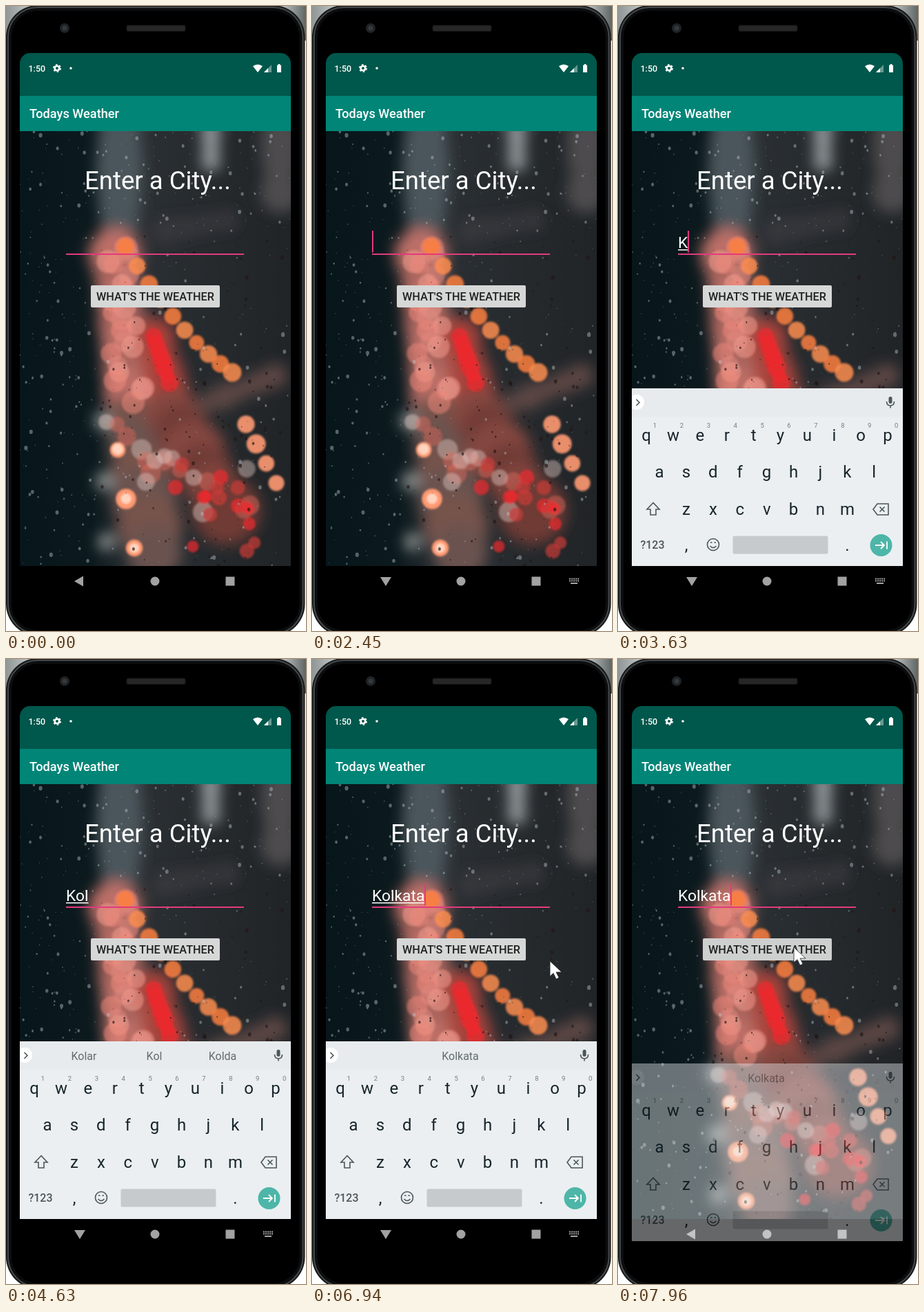
An HTML page for the animation above (8000 ms loop, 435 by 904 pixels).

```html
<!DOCTYPE html>
<html lang="en">
<head>
<meta charset="utf-8">
<title>Weather app demo</title>
<style>
  html, body { margin: 0; width: 100%; height: 100%; overflow: hidden; background: #fff; }
  svg { display: block; width: 435px; height: 904px; font-family: Roboto, sans-serif; }
  .medium { font-weight: 500; }
  .mid { text-anchor: middle; }
  .line { fill: none; stroke: #4b565b; stroke-width: 1.6; }
</style>
</head>
<body>
<svg viewBox="0 0 435 904">
  <defs>
    <linearGradient id="cloud"><stop stop-color="#8f9695"/><stop offset=".1" stop-color="#d0d3d2"/><stop offset=".9" stop-color="#d8dbda"/><stop offset="1" stop-color="#5d6665"/></linearGradient>
    <linearGradient id="night"><stop stop-color="#07161a"/><stop offset=".27" stop-color="#0c1a1e"/><stop offset=".42" stop-color="#2b3034"/><stop offset="1" stop-color="#202427"/></linearGradient>
    <filter id="soft" x="-20%" y="-20%" width="140%" height="140%"><feGaussianBlur stdDeviation="10"/></filter>
    <filter id="glow"><feGaussianBlur stdDeviation="1.6"/></filter>
    <clipPath id="photoClip"><path d="M20 181h393v629H20z"/></clipPath>
    <clipPath id="screenClip"><rect x="20" y="68" width="393" height="787" rx="15"/></clipPath>
  </defs>

  <path fill="url(#cloud)" d="M0 0h435v50H0z"/>
  <rect y="-1" width="433.500" height="912" rx="46" fill="#17191a"/>
  <rect x="3" y="2" width="427.500" height="906" rx="43" fill="#0c0d0e" stroke="#46494b" stroke-width="2"/>
  <rect x="8" y="7" width="417.500" height="896" rx="38" fill="#000"/>
  <circle cx="85" cy="32" r="7" fill="#202326"/><circle cx="85" cy="32" r="3.500" fill="#33393d"/>
  <rect x="175" y="28" width="85" height="8.500" rx="2" fill="#262626" stroke="#171717"/>

  <g clip-path="url(#screenClip)">
    <path fill="#00574b" d="M20 68h393v62H20z"/>
    <path fill="#008577" d="M20 130h393v51H20z"/>
    <g fill="#fff" class="medium">
      <text x="32.500" y="95" font-size="12.500">1:50</text>
      <circle cx="74" cy="90" r="3.300" fill="none" stroke="#fff" stroke-width="2.600"/>
      <circle cx="74" cy="90" r="5.200" fill="none" stroke="#fff" stroke-width="1.600" stroke-dasharray="2.700 2.745"/>
      <circle cx="94" cy="90" r="1.800"/>
      <path d="M358 87q7-5 14 0l-7 9z"/>
      <path d="M385 85v11h-11z" opacity=".4"/><path d="M380 90v6h-6z"/>
      <path d="M393 85.500h1.700V84h2.600v1.500h1.700V96h-6z"/>
      <text x="34" y="162" font-size="18.200">Todays Weather</text>
    </g>

    <g clip-path="url(#photoClip)">
      <path fill="url(#night)" d="M20 181h393v629H20z"/>
      <g id="haze" filter="url(#soft)"></g>
      <g id="bokeh" filter="url(#glow)"></g>
      <g id="rain"></g>
    </g>

    <text x="114" y="265" font-size="36.600" fill="#fff">Enter a City...</text>
    <path fill="#e23a7e" d="M87 358h258v2H87z"/>
    <text id="city" x="87" y="350" font-size="22.800" fill="#fff"></text>
    <rect id="underline" x="87" y="352" height="1.500" fill="#fff"/>
    <rect id="caret" y="325" width="2" height="31.500" fill="#e23a7e"/>
    <rect x="123" y="404" width="187" height="32" rx="2" fill="#d6d7d7"/>
    <rect id="ripple" x="123" y="404" width="187" height="32" rx="2"/>
    <text class="mid medium" x="216.500" y="426" font-size="16.300" fill="#202020">WHAT'S THE WEATHER</text>

    <g fill="#a2a2a2">
      <path id="back"/>
      <circle cx="216" cy="832" r="6.500"/>
      <path d="M318.500 825.500h13v13h-13z"/>
      <g id="imeIcon" fill="none" stroke="#a2a2a2" stroke-width="2" stroke-dasharray="2 1">
        <path d="M373 828.500h14M373 831.500h14"/><path d="M375 835h10" stroke-dasharray="none"/>
      </g>
    </g>

    <g id="keyboard">
      <path fill="#ebeff2" d="M20 553h393v257H20z"/>
      <path fill="#e7ebee" d="M20 553h393v41H20z"/>
      <circle cx="27" cy="573" r="11" fill="#fff"/>
      <path class="line" d="M26.500 569l4.500 4.500-4.500 4.500"/>
      <g id="hints" class="mid" font-size="16" fill="#626b70"></g>
      <rect x="392.500" y="565" width="5" height="10" rx="2.500" fill="#4b565b"/>
      <path class="line" d="M389.500 572q0 6 5.500 6t5.500-6M395 578v3.500"/>
      <g id="keys" class="mid" font-size="24" fill="#17252b"></g>
      <path class="line" d="M51 718.500l-9 9.500h5v8h8v-8h5z"/>
      <path class="line" d="M370 728l6-8h16v16h-16zM379.500 724.500l7 7m0-7l-7 7"/>
      <text class="mid medium" x="50" y="785" font-size="16" fill="#4b565b">?123</text>
      <circle class="line" cx="138" cy="779" r="8.500"/>
      <path class="line" d="M133.500 781q4.500 5 9 0M134 776h2.500m3 0h2.500"/>
      <rect x="166.500" y="766.500" width="138" height="26" rx="2" fill="#c7cacd"/>
      <circle cx="381.500" cy="780" r="16" fill="#4db6a8"/>
      <path d="M373 780h13m-5-5l5 5-5 5M390 774.500v11" fill="none" stroke="#fff" stroke-width="1.800"/>
    </g>
  </g>

  <circle id="click" r="18" fill="#b5b800" fill-opacity=".77"/>
  <path id="pointer" d="M0 0V22L5 17.500 9 26 13 24 9 16H17Z" fill="#fff" stroke="#2a2a2a" stroke-width=".8"/>
</svg>
<script>
const el = id => document.getElementById(id);
const set = (id, name, value) => el(id).setAttribute(name, value);
const show = (id, on) => set(id, 'visibility', on ? 'visible' : 'hidden');
const clamp = p => Math.min(1, Math.max(0, p));
const mix = (from, to, p) => from.map((v, i) => v + (to[i] - v) * p);
function add(parent, tag, attrs, text = '') {
  const node = document.createElementNS('http://www.w3.org/2000/svg', tag);
  for (const name in attrs) node.setAttribute(name, attrs[name]);
  node.textContent = text;
  return el(parent).appendChild(node);
}

let seed = 7;
const random = () => (seed = seed * 16807 % 2147483647) / 2147483647;
const jitter = size => (random() * 2 - 1) * size;

// Lights strung from one point to another, scattered around the line
function trail(layer, count, from, to, { r, colors, opacity = 1, spread = 0, sag = 0 }) {
  for (let i = 0; i < count; i++) {
    const p = i / (count - 1);
    const [x, y] = mix(from, to, p);
    add(layer, 'circle', {
      cx: x + jitter(spread), cy: y + sag * 4 * p * (1 - p) + jitter(spread / 3),
      r: r * (1 + jitter(.15)), fill: colors[i % colors.length], opacity
    });
  }
}

const salmon = '#f2897c', red = '#ee2a2f', orange = '#fc7f3f', peach = '#ff9a72', pale = '#dcc5be';

// Blurred street: buildings, road glow, kerb
trail('haze', 6, [165, 180], [165, 310], { r: 32, colors: ['#4c565c'] });
trail('haze', 3, [297, 180], [297, 225], { r: 13, colors: ['#949b9e'] });
trail('haze', 4, [398, 190], [398, 270], { r: 26, colors: ['#4d4b4d'] });
trail('haze', 4, [230, 325], [320, 310], { r: 16, colors: ['#37383c'] });
trail('haze', 7, [158, 360], [178, 560], { r: 34, colors: ['#bd7068', '#a8655d'] });
trail('haze', 4, [215, 480], [235, 560], { r: 28, colors: ['#a8423b'] });
trail('haze', 6, [180, 600], [215, 790], { r: 42, colors: ['#76534c', '#6a5350'] });
trail('haze', 6, [240, 590], [320, 730], { r: 44, colors: ['#84463f', '#6f3a36'] });
trail('haze', 5, [290, 575], [390, 535], { r: 17, colors: ['#5d4744'] });
trail('haze', 3, [140, 600], [146, 775], { r: 14, colors: ['#979a99'] });

// Out-of-focus lights
trail('bokeh', 22, [157, 345], [180, 570], { r: 15, colors: [salmon, '#df8a80', '#f7a092'], opacity: .5, spread: 22 });
trail('bokeh', 18, [215, 620], [300, 720], { r: 13, colors: [pale, '#e0685c'], opacity: .45, spread: 75 });
trail('bokeh', 7, [214, 478], [237, 545], { r: 12, colors: [red], opacity: .75 });
trail('bokeh', 16, [285, 665], [315, 785], { r: 10, colors: [red, '#c93b38'], opacity: .7, spread: 55 });
trail('bokeh', 10, [173, 348], [328, 530], { r: 12, colors: [orange, '#fb8d50'], opacity: .85, sag: 20 });
trail('bokeh', 4, [348, 605], [392, 690], { r: 13, colors: [peach], opacity: .9 });
trail('bokeh', 3, [162, 642], [186, 784], { r: 13, colors: [peach] });
trail('bokeh', 3, [162, 641], [186, 784], { r: 8, colors: ['#ffdcc8'], opacity: .9 });

// Raindrops: dark against the lights, bright against the night
for (let i = 0; i < 620; i++) {
  const cx = 20 + random() * 393, cy = 181 + random() * 629;
  const r = .5 + 2.2 * random() ** 3;
  const dark = cx > 130 && cy > 330 && random() < .65;
  add('rain', 'ellipse', { cx, cy, rx: r, ry: r * 1.25, fill: dark ? '#231616' : '#b5c2c8', opacity: dark ? .65 : .45 });
}

const keyStep = 38.9;
[['qwertyuiop', 41], ['asdfghjkl', 60], ['zxcvbnm', 99]].forEach(([row, left], r) =>
  [...row].forEach((letter, i) => {
    const x = left + i * keyStep;
    add('keys', 'text', { x, y: 629 + r * 53.3 }, letter);
    if (r === 0) add('keys', 'text', { x: x + 12.5, y: 610, 'font-size': 9.5, fill: '#747c80' }, (i + 1) % 10);
  }));
add('keys', 'text', { x: 99, y: 788 }, ',');
add('keys', 'text', { x: 332.5, y: 788 }, '.');
const hints = [113, 215, 314].map(x => add('hints', 'text', { x, y: 579.5 }));

// Timeline, all times in ms
const city = 'Kolkata';
const keyTimes = [3630, 3850, 4080, 5010, 5160, 5400, 5620];
const caretToggles = [290, 790, 1290, 2300, 2450, 3230, 3630, 4630, 5010, 6110, 6560, 7060, 7570];
const suggested = [
  [0, ',,'],
  [3690, 'Ki,K,Key'],
  [3850, 'Kota,Ko,Korea'],
  [4080, 'Kolar,Kol,Kolda'],
  [5010, 'Kolkar,Kolkata,Kolkatan'],
  [5240, 'Kolkate,Kolkata,Kolkatan'],
  [5400, 'Kolkatta,Kolkata evening,'],
  [5620, ',Kolkata,']
];
const passed = (times, t) => times.filter(time => time <= t).length;
const inside = (t, from, to) => t >= from && t < to;
const halfSteps = (t, start) => clamp(Math.floor((t - start) / 75) / 2);

function write(node, text) {
  if (node.textContent !== text) node.textContent = text;
}
function glide(t, start, end, from, to) {
  const p = clamp((t - start) / (end - start));
  return mix(from, to, p * p * (3 - 2 * p));
}
function pointerAt(t) {
  if (inside(t, 380, 1300)) return glide(t, 380, 910, [433, 739], [254, 333]);
  if (inside(t, 1300, 1460)) return [260, 333];
  if (t >= 6640) return glide(t, 6640, 7340, [404, 450], [255, 417]);
  return null;
}

function draw() {
  const t = performance.now() % 8000;
  const text = city.slice(0, passed(keyTimes, t));
  write(el('city'), text);
  const width = text ? el('city').getComputedTextLength() : 0;
  set('underline', 'width', t < 7960 ? width : 0);
  set('caret', 'x', Math.round(87 + width));
  show('caret', passed(caretToggles, t) % 2);
  const words = suggested.findLast(([time]) => time <= t)[1].split(',');
  words.forEach((word, i) => write(hints[i], word));

  const opening = halfSteps(t, 2700), closing = halfSteps(t, 7810);
  set('keyboard', 'transform', `translate(0 ${16 * (1 - opening) + 32 * closing ** 2})`);
  set('keyboard', 'opacity', t < 2700 ? 0 : .84 + .16 * opening - .57 * closing);
  set('ripple', 'opacity', t < 7730 ? 0 : .115 * (1 - .7 * closing));

  const typing = inside(t, 1610, 7885);
  set('back', 'd', typing ? 'M99 826h16l-8 13z' : 'M99 832l13-7.500v15z');
  show('imeIcon', typing);

  const tip = pointerAt(t);
  show('pointer', tip);
  show('click', inside(t, 1210, 1380) || inside(t, 7650, 7730));
  if (tip) {
    set('pointer', 'transform', `translate(${tip})`);
    set('click', 'transform', `translate(${tip[0] - 1} ${tip[1] - 1})`);
  }
  requestAnimationFrame(draw);
}
draw();
</script>
</body>
</html>
```
